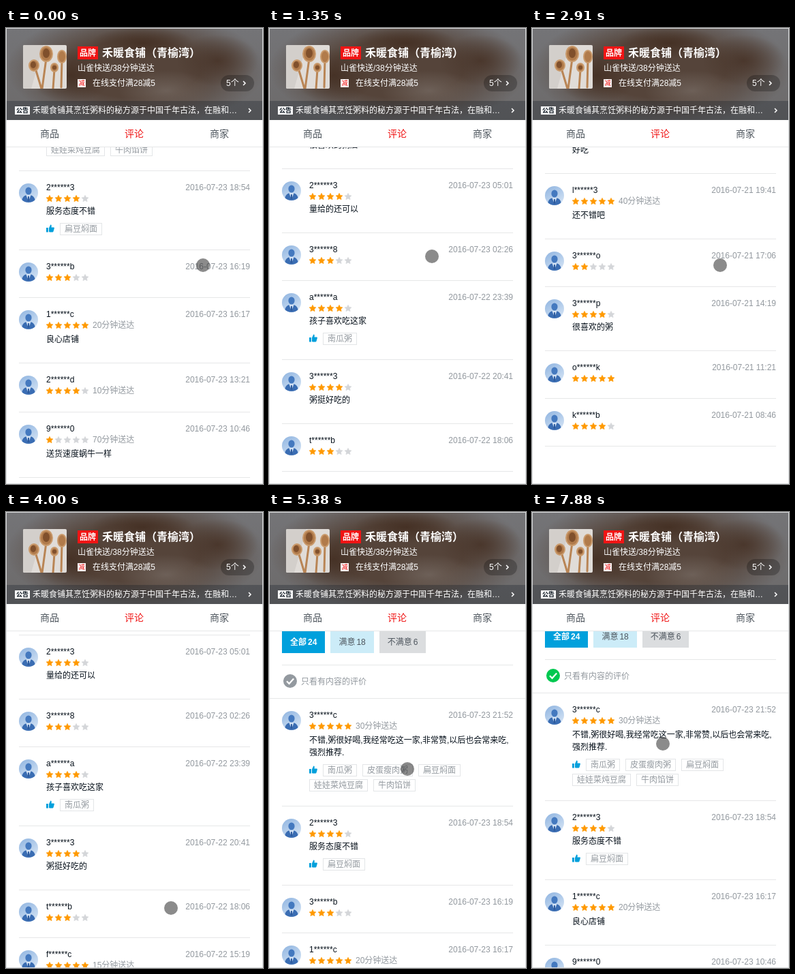
Write an HTML page that moves like this. It is 377x669 px and loops after 8 s.

```html
<!DOCTYPE html>
<html lang="zh-CN">
<head>
<meta charset="utf-8">
<title>评论</title>
<style>
* { box-sizing: border-box; margin: 0; padding: 0; }
html, body { width: 100%; height: 100%; overflow: hidden; background: #fff; }
body { font: 12px/20px "Liberation Sans", "Noto Sans CJK SC", "Noto Sans CJK", sans-serif; color: #07111b; }
#stage { position: relative; width: 377px; height: 669px; overflow: hidden; background: #fff; }
#stage::after { content: ""; position: absolute; inset: 0; border: 1px solid #dcdee0; }
p, div, svg { position: absolute; }
p { white-space: pre; }
.grey { color: #93999f; }
.orange { color: #f90; }
.white { color: #fff; }
.mid { width: 137px; text-align: center; }

#head {
  left: 0; top: 0; width: 377px; height: 135px; overflow: hidden;
  background:
    radial-gradient(75px 24px at 200px 22px, #453125, transparent),
    radial-gradient(60px 38px at 310px 48px, #4a372c, transparent),
    radial-gradient(60px 40px at 95px 70px, #463226, transparent),
    radial-gradient(70px 30px at 235px 92px, #6d6058, transparent),
    radial-gradient(190px 85px at 190px 60px, #55443a 50%, transparent),
    linear-gradient(#747477, #6c6a6a);
}
#photo { left: 25px; top: 25px; border-radius: 2px; background: #e0dcd8; }
#brand { left: 105px; top: 27px; width: 30px; height: 19px; background: #f01414; }
#cut { left: 105px; top: 75px; width: 12px; height: 12px; background: #fdf3f3; }
#count { left: 315px; top: 69px; width: 49px; height: 24px; border-radius: 12px; background: rgba(0,0,0,.25); }
#notice { left: 0; top: 107px; width: 377px; height: 28px; background: rgba(7,17,27,.26); }
#notetag { left: 13px; top: 115px; width: 22px; height: 12px; background: #fff; }
.title { font-size: 16px; font-weight: bold; }
.bold { font-weight: bold; }
.tiny { font-size: 9px; }

#tabs { left: 0; top: 135px; width: 377px; height: 40px; background: #fff; border-bottom: 1px solid #e6e7e8; }
.tab { font-size: 14px; color: #4d555d; }
.on { color: #f01414; }

#view { left: 0; top: 175px; width: 377px; height: 493px; overflow: hidden; }
#list { left: 0; top: -175px; width: 377px; }
.score { font-size: 24px; }
.rule { left: 138px; top: 200px; width: 1px; height: 82px; background: #e6e7e8; }
.split { left: 0; top: 300px; width: 377px; height: 18px; background: #f3f5f7; border: solid #e0e2e4; border-width: 1px 0; }
.picks { left: 19px; top: 336px; display: flex; gap: 8px; }
.picks p { position: static; height: 32px; padding: 0 12px; line-height: 32px; color: #4d555d; }
.picks .all { color: #fff; font-weight: bold; }
.picks b { font-weight: inherit; margin-left: 2px; }
.line { height: 1px; background: #e6e7e8; }
#check { left: 21px; top: 399px; fill: #93999f; }
.only #check { fill: #00c850; }
#items { left: 19px; top: 435px; width: 339px; }
.item { position: relative; border-bottom: 1px solid #e6e7e8; }
.only .empty { display: none; }
.date { right: 0; top: 14px; }
.words { left: 40px; line-height: 18px; }
.tags { left: 40px; width: 299px; display: flex; flex-wrap: wrap; gap: 4px 8px; }
.tags svg { position: static; margin-top: 2px; }
.tags span { height: 18px; padding: 0 6px; line-height: 16px; border: 1px solid #e3e5e7; color: #93999f; }
#dot { left: -10px; top: -10px; width: 20px; height: 20px; border-radius: 50%; background: rgba(40,40,40,.54); }
</style>
</head>
<body>
<main id="stage">
  <div id="view"><div id="list"></div></div>
  <div id="head">
    <svg id="photo" width="64" height="64" viewBox="0 0 64 64" fill="none" stroke-linecap="round">
      <path d="M0 0h30L12 64H0z" fill="#d3cfcb"/>
      <g stroke="#b98555" stroke-width="3">
        <path d="M18 34L27 64M34 20L28 64M46 36L44 64M57 22L56 62"/>
      </g>
      <g fill="#b17b4b" stroke="#c99a6c" stroke-width="2">
        <ellipse cx="16" cy="30" rx="7" ry="8"/><ellipse cx="34" cy="13" rx="9" ry="11"/>
        <ellipse cx="46" cy="33" rx="5" ry="6"/><ellipse cx="57" cy="17" rx="6" ry="9"/>
      </g>
      <g fill="#80502c"><ellipse cx="15" cy="29" rx="4" ry="5"/><ellipse cx="34" cy="12" rx="5" ry="7"/><circle cx="46" cy="33" r="3"/></g>
    </svg>
    <div id="brand"></div><div id="cut"></div><div id="count"></div>
    <div id="notice"></div><div id="notetag"></div>
  </div>
  <div id="tabs"></div>
  <div id="dot"></div>
</main>
<script>
const $ = id => document.getElementById(id);
const add = (id, html) => $(id).insertAdjacentHTML('beforeend', html);

// y is the middle of the line
const label = (x, y, text, cls = '') =>
  `<p class="${cls}" style="left:${x}px;top:${y - 10}px">${text}</p>`;

const chevron = (x, y) =>
  `<svg style="left:${x - 3}px;top:${y - 4}px" width="6" height="8"><path d="M1 1l3 3-3 3" fill="none" stroke="#fff" stroke-width="1.5"/></svg>`;

const star = (cx, cy, r, fill) => {
  const pts = Array.from({ length: 10 }, (_, i) => {
    const a = i * Math.PI / 5, d = i % 2 ? r * .5 : r;
    return `${(cx + d * Math.sin(a)).toFixed(2)},${(cy - d * Math.cos(a)).toFixed(2)}`;
  });
  return `<polygon points="${pts.join(' ')}" fill="${fill}" stroke="${fill}" stroke-width=".6" stroke-linejoin="round"/>`;
};

// x is the middle of the first star
const stars = (x, y, n, step, r) => {
  let s = '';
  for (let i = 0; i < 5; i++) s += star(10 + i * step, 10.5, r, i < n ? '#f90' : '#d4d6d9');
  return `<svg style="left:${x - 10}px;top:${y - 10}px" width="${step * 4 + 20}" height="20">${s}</svg>`;
};

const avatar = `<svg style="left:0;top:18px" width="28" height="28">
  <defs><linearGradient id="sky" x2=".6" y2="1"><stop stop-color="#8fb4e0"/><stop offset="1" stop-color="#cfe0f3"/></linearGradient>
  <clipPath id="disc"><circle cx="14" cy="14" r="14"/></clipPath></defs>
  <g clip-path="url(#disc)"><path d="M0 0h28v28H0z" fill="url(#sky)"/>
  <path d="M4 28c0-8 4-11 10-11s10 3 10 11z" fill="#3a6db3"/>
  <path d="M10.5 17h7l-3.5 10z" fill="#d3e2f4"/><path d="M13.2 19h1.6l.8 6-1.6 2-1.6-2z" fill="#2b5a9e"/>
  <ellipse cx="14" cy="11" rx="4.6" ry="5.6" fill="#4479bf"/></g></svg>`;

const thumb = `<svg width="12" height="12" fill="#00a0dc"><path d="M0 5h3v6.5H0zM4 11V5.5L6.3.5c1.7 0 1.7 1.7 1.2 4H11c1 0 1 .9.8 1.5l-1.3 4.5c-.2.6-.6 1-1.2 1H5z"/></svg>`;

// name, time, stars, words, delivery minutes, dishes
const reviews = [
  ['3******c', '23 21:52', 5, '不错,粥很好喝,我经常吃这一家,非常赞,以后也会常来吃,\n强烈推荐.', 30, '南瓜粥 皮蛋瘦肉粥 扁豆焖面 娃娃菜炖豆腐 牛肉馅饼'],
  ['2******3', '23 18:54', 4, '服务态度不错', 0, '扁豆焖面'],
  ['3******b', '23 16:19', 3],
  ['1******c', '23 16:17', 5, '良心店铺', 20],
  ['2******d', '23 13:21', 4, '', 10],
  ['9******0', '23 10:46', 1, '送货速度蜗牛一样', 70],
  ['d******c', '23 10:39', 5, '很喜欢的粥店'],
  ['2******3', '23 05:01', 4, '量给的还可以'],
  ['3******8', '23 02:26', 3],
  ['a******a', '22 23:39', 4, '孩子喜欢吃这家', 0, '南瓜粥'],
  ['3******3', '22 20:41', 4, '粥挺好吃的'],
  ['t******b', '22 18:06', 3],
  ['f******c', '22 15:19', 5, '送货速度很快', 15],
  ['k******3', '22 13:03', 4],
  ['u******b', '22 10:33', 4, '下雨天给快递小哥点个赞'],
  ['s******c', '22 07:40', 4, '好'],
  ['z******3', '22 04:45', 5, '吃了还想再吃'],
  ['n******b', '22 01:52', 3, '发票开的不对'],
  ['m******c', '21 22:48', 3, '好吃'],
  ['l******3', '21 19:41', 5, '还不错吧', 40],
  ['3******o', '21 17:06', 2],
  ['3******p', '21 14:19', 4, '很喜欢的粥'],
  ['o******k', '21 11:21', 5],
  ['k******b', '21 08:46', 4]
];

const review = ([name, time, score, words = '', mins = 0, dishes = '']) => {
  const tags = dishes ? dishes.split(' ') : [];
  const shift = mins ? 2 : 0;
  const lines = words ? words.split('\n').length : 0;
  const rows = Math.ceil(tags.length / 3);
  const height = 70 + shift + (lines && 6 + 18 * lines) + 22 * rows;
  let s = avatar + label(40, 24, name) + `<p class="date grey">2016-07-${time}</p>` + stars(45, 40, score, 13, 5.2);
  if (mins) s += label(108, 40, mins + '分钟送达', 'grey');
  if (words) s += `<p class="words" style="top:${50 + shift}px">${words}</p>`;
  if (rows) s += `<div class="tags" style="top:${58 + shift + 18 * lines}px">${thumb}${tags.map(d => `<span>${d}</span>`).join('')}</div>`;
  return `<div class="item${words ? '' : ' empty'}" style="height:${height}px">${s}</div>`;
};

const pick = (bg, name, n, cls = '') =>
  `<p class="${cls}" style="background:${bg}">${name}<b>${n}</b></p>`;

add('head',
  label(108, 36.5, '品牌', 'white bold') +
  label(141, 37, '禾暖食铺（青榆湾）', 'white title') +
  label(105, 59, '山雀快送/38分钟送达', 'white') +
  label(106.5, 81, '减', 'on tiny') +
  label(127, 81, '在线支付满28减5', 'white') +
  label(323, 81, '5个', 'white') + chevron(350, 81) +
  label(15, 121, '公告', 'tiny bold') +
  label(39, 121, '禾暖食铺其烹饪粥料的秘方源于中国千年古法，在融和…', 'white') + chevron(358, 121));

add('tabs', label(50, 20, '商品', 'tab') + label(174, 20, '评论', 'tab on') + label(299, 20, '商家', 'tab'));

add('list',
  label(0, 220, '4.2', 'mid score orange') + label(0, 245, '综合评分', 'mid') +
  label(0, 265, '高于周边商家69.2%', 'mid grey') + '<div class="rule"></div>' +
  label(163, 214, '服务态度') + stars(230, 214, 4, 21, 8) + label(334, 214, '4.1', 'orange') +
  label(163, 240, '商品评分') + stars(230, 240, 4, 21, 8) + label(334, 240, '4.3', 'orange') +
  label(163, 266, '送达时间') + label(223, 266, '38分钟', 'grey') +
  '<div class="split"></div><div class="picks">' +
  pick('#00a0dc', '全部', 24, 'all') + pick('#ccecf8', '满意', 18) + pick('#dbdddf', '不满意', 6) + '</div>' +
  '<div class="line" style="left:19px;top:385px;width:339px"></div>' +
  '<svg id="check" width="20" height="20"><circle cx="10" cy="10" r="10"/><path d="M5 10.2l3.6 3.6L15.2 6.6" fill="none" stroke="#fff" stroke-width="2.2"/></svg>' +
  label(47, 410, '只看有内容的评价', 'grey') +
  '<div class="line" style="left:0;top:434px;width:377px"></div>' +
  `<div id="items">${reviews.map(review).join('')}</div>`);

const LOOP = 8000, TOGGLE = 7000;

// start of a stretch, number of equal held steps in it
const beats = [[0, 1], [150, 9], [1350, 12], [2910, 8], [4000, 10], [5380, 6], [6160, 12], [7880, 1], [LOOP, 1]];

// time, scroll, pointer x, pointer y
const track = [
  [0, 383, 289, 348], [560, 600, 252, 520], [1350, 930, 239, 335],
  [1900, 1240, 262, 530], [2250, 1560, 270, 350], [2600, 1830, 268, 500],
  [2910, 2003, 276, 348], [3340, 1947, 262, 360], [4000, 956, 242, 581],
  [4400, 760, 230, 360], [4800, 420, 225, 560], [5380, 161, 203, 377],
  [5660, 0, 180, 520], [6160, 0, 82, 414], [6700, 0, 36, 410],
  [7000, 0, 27, 409], [7400, 0, 120, 430], [7720, 0, 190, 500],
  [7880, 169, 192, 340], [LOOP, 169, 192, 340]
];

const segment = (list, t) => {
  let i = 0;
  while (i < list.length - 2 && t >= list[i + 1][0]) i++;
  return [list[i], list[i + 1]];
};

const hold = t => {
  const [[from, n], [to]] = segment(beats, t);
  const step = (to - from) / n;
  return from + Math.floor((t - from) / step) * step;
};

const draw = time => {
  const t = hold(time % LOOP);
  const [a, b] = segment(track, t);
  const k = (t - a[0]) / (b[0] - a[0]);
  const [, scroll, x, y] = a.map((v, i) => v + (b[i] - v) * k);
  $('list').className = t >= TOGGLE ? 'only' : '';
  $('list').style.transform = `translateY(${-Math.round(scroll)}px)`;
  $('dot').style.transform = `translate(${x}px,${y}px)`;
};

const start = performance.now();
const tick = () => {
  draw(performance.now() - start);
  requestAnimationFrame(tick);
};
tick();
</script>
</body>
</html>
```
